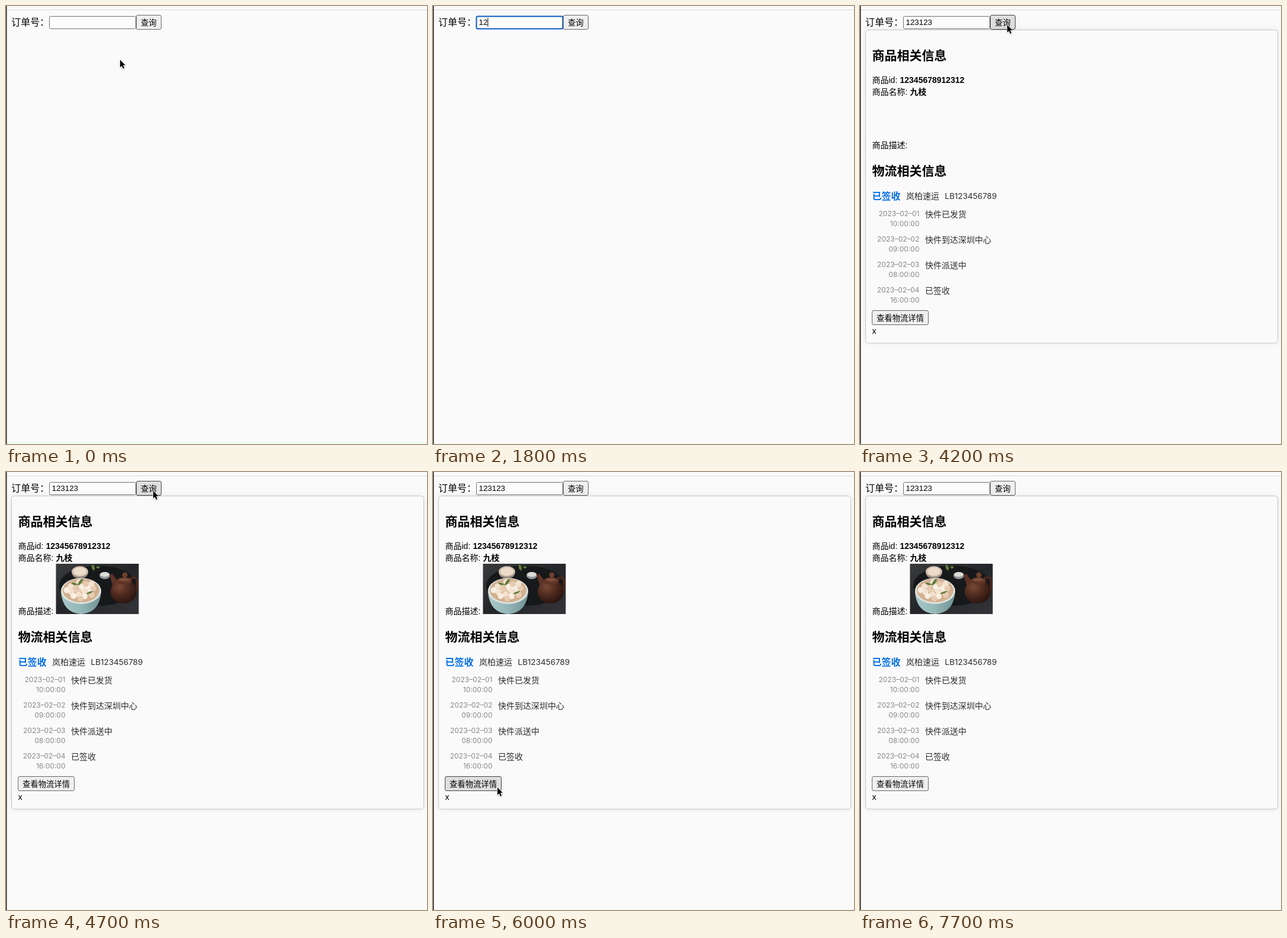
Recreate the animation shown at these times as an HTML page. Size 712 px wide and 740 px high, loop 7800 ms.

```html
<!DOCTYPE html>
<html lang="zh-CN">
<head>
<meta charset="utf-8">
<title>订单查询</title>
<style>
html, body { margin: 0; width: 100%; height: 100%; overflow: hidden; background: #fafafa; }
svg { display: block; width: 712px; height: 740px; }
text { font-family: "Liberation Sans", "Noto Sans CJK SC", "Noto Sans CJK", sans-serif; font-size: 14px; font-weight: 500; fill: #000; white-space: pre; }
.label { font-size: 16px; font-weight: 400; }
.title { font-size: 21px; font-weight: bold; }
.strong { font-weight: bold; }
.status { font-size: 16px; font-weight: bold; fill: #026dec; }
.soft { fill: #2c2c2c; font-weight: 400; }
.code { font-family: Inter, sans-serif; font-size: 13.5px; }
.date { font-family: Inter, sans-serif; font-size: 12px; font-weight: 400; fill: #888; text-anchor: end; }
.control { font-size: 13.333px; }
.button { fill: #efefef; stroke: #666; }
.button.hover { fill: #dedede; stroke: #444; }
#field { fill: #fff; fill-opacity: .5; stroke: #707070; }
#field.focus { stroke: #0a5cc2; stroke-width: 2; fill-opacity: 1; }
</style>
</head>
<body>
<svg viewBox="0 0 712 740" xmlns="http://www.w3.org/2000/svg">
  <defs>
    <filter id="shadow" x="-5%" y="-5%" width="110%" height="110%">
      <feDropShadow dx="0" dy="0" stdDeviation="4" flood-color="#000" flood-opacity=".08"/>
    </filter>
    <filter id="drop" x="-50%" y="-50%" width="200%" height="200%">
      <feDropShadow dx="0" dy="1" stdDeviation=".8" flood-color="#000" flood-opacity=".3"/>
    </filter>
    <clipPath id="frame"><rect x="84.500" y="155" width="140" height="85"/></clipPath>
    <linearGradient id="table" x2="1" y2="1">
      <stop offset="0" stop-color="#3a3b3d"/>
      <stop offset=".5" stop-color="#242528"/>
      <stop offset="1" stop-color="#343539"/>
    </linearGradient>
    <radialGradient id="clay" cx=".35" cy=".3" r=".75">
      <stop offset="0" stop-color="#7a4936"/>
      <stop offset=".5" stop-color="#4d291e"/>
      <stop offset="1" stop-color="#29140f"/>
    </radialGradient>
    <linearGradient id="glaze">
      <stop offset="0" stop-color="#a9c9c9"/>
      <stop offset=".5" stop-color="#94b6b7"/>
      <stop offset="1" stop-color="#6f9193"/>
    </linearGradient>
  </defs>
  <rect width="712" height="740" fill="#fafafa"/>
  <rect id="strip" width="712" fill="#f1faf0"/>
  <rect y="6" width="712" height="1" fill="#dadada"/>
  <rect width="1.300" height="740" fill="#111"/>

  <text class="label" x="9" y="32.500">订单号：</text>
  <rect id="field" x="73.500" y="17.500" width="146" height="21" rx="2"/>
  <text id="typed" class="control" x="77.500" y="32"></text>
  <rect id="caret" y="20" width="1" height="15" fill="#000"/>
  <rect id="search" class="button" x="220.500" y="15.500" width="42" height="24" rx="2.500"/>
  <text class="control" x="228" y="32.500">查询</text>

  <g id="card">
    <rect x="9.500" y="40.500" width="697" height="529" rx="5" fill="#fafafa" stroke="#c6c6c6" filter="url(#shadow)"/>
    <text class="title" x="20.500" y="91">商品相关信息</text>
    <text x="20.500" y="130">商品id:</text>
    <text class="strong" x="67.500" y="130">12345678912312</text>
    <text x="20.500" y="150">商品名称:</text>
    <text class="strong" x="84.500" y="150">九枝</text>
    <text x="20.500" y="240">商品描述:</text>
    <g id="photo" clip-path="url(#frame)">
      <rect x="84" y="155" width="141" height="86" fill="url(#table)"/>
      <ellipse cx="156" cy="192" rx="66" ry="34" fill="#17181a"/>
      <path d="M111 169Q112 180 125 180Q138 180 139 169Z" fill="#8d8378"/>
      <ellipse cx="125" cy="168" rx="14" ry="9" fill="#cdbcaa"/>
      <ellipse cx="125" cy="168" rx="11" ry="7" fill="#eddcc9"/>
      <ellipse cx="167" cy="175" rx="9" ry="6" fill="#94979a"/>
      <ellipse cx="167" cy="173" rx="8" ry="4" fill="#dcdcd6"/>
      <path d="M93 203Q96 238 127 240Q158 238 161 203Z" fill="url(#glaze)"/>
      <ellipse cx="127" cy="201" rx="34" ry="22" fill="#dce2de"/>
      <ellipse cx="127" cy="200" rx="31" ry="20" fill="#d2af8f"/>
      <g id="fruit"></g>
      <g fill="#5f7b3c">
        <path d="M121 192q2-10 9-12q0 9-9 12ZM122 190q-8-5-12-2q5 5 12 2ZM135 206q5-5 13-5q-5 6-13 5ZM146 156q-4 6 3 11q4-6-3-11ZM152 161q4-4 7 0q-4 4-7 0Z"/>
      </g>
      <path d="M182 196L175 174L180 172L189 185Z" fill="#5b3225"/>
      <path d="M210 180Q223 174 222 190Q221 204 214 209" fill="none" stroke="#4a271c" stroke-width="4"/>
      <ellipse cx="199" cy="202" rx="22" ry="20" fill="url(#clay)"/>
      <ellipse cx="200" cy="184" rx="13" ry="6" fill="#603526"/>
      <ellipse cx="200" cy="182" rx="9" ry="3" fill="#7c4d3a"/>
      <circle cx="201" cy="174" r="4.500" fill="#6c402f"/>
    </g>
    <text class="title" x="20.500" y="286">物流相关信息</text>
    <text class="status" x="20.500" y="327">已签收</text>
    <text class="soft" x="78" y="326">岚柏速运</text>
    <text class="soft code" x="143.500" y="326">LB123456789</text>
    <g id="steps"></g>
    <rect id="details" class="button" x="20.500" y="514.500" width="95" height="24" rx="2.500"/>
    <text class="control" x="28" y="531.500">查看物流详情</text>
    <text x="20.500" y="554">x</text>
  </g>

  <path id="beam" d="M-2.500-7Q0-7 0-5V5Q0 7-2.500 7M2.500-7Q0-7 0-5M0 5Q0 7 2.500 7" fill="none" stroke="#222"/>
  <path id="arrow" d="M0 0V12.500L2.900 9.900L5 14.700L7.100 13.700L5 9.100H8.900Z" fill="#000" stroke="#fff" stroke-width="1.200" paint-order="stroke" filter="url(#drop)"/>
</svg>
<script>
const LOOP = 7800, TICK = 100;
const ORDER = "123123";
const $ = id => document.getElementById(id);
const show = (id, on) => $(id).setAttribute("display", on ? "inline" : "none");
const between = (t, from, to) => t >= from && t < to;

// Pointer stops: time, x, y
const path = [
  [0, 193, 91], [100, 190, 84], [500, 150, 28],
  [2300, 246, 48], [2400, 262, 43], [2600, 249, 32],
  [4800, 249, 32], [5100, 225, 313], [5500, 109, 533],
  [6200, 109, 533], [6600, 614, 21]
];

const steps = [
  ["01", "10", "快件已发货"],
  ["02", "09", "快件到达深圳中心"],
  ["03", "08", "快件派送中"],
  ["04", "16", "已签收"]
];

$("steps").innerHTML = steps.map(([day, hour, note], i) => {
  const y = 355 + i * 43;
  return `<text class="date" x="100.500" y="${y}">2023–02–${day}</text>
    <text class="date" x="100.500" y="${y + 16.5}">${hour}:00:00</text>
    <text class="soft" x="110" y="${y + 2}">${note}</text>`;
}).join("");

$("fruit").innerHTML = Array.from({ length: 20 }, (_, i) => {
  const r = Math.sqrt((i + .5) / 20), a = i * 2.4;
  const x = 127 + 26 * r * Math.cos(a), y = 199 + 15 * r * Math.sin(a);
  const tone = ["#f3e2d0", "#e6cbb2", "#f8eee1"][i % 3];
  return `<circle cx="${x.toFixed(1)}" cy="${y.toFixed(1)}" r="5" fill="${tone}"/>`;
}).join("");

function pointer(t) {
  const i = path.findIndex(p => p[0] > t);
  if (i < 0) return path[path.length - 1].slice(1);
  const [t0, x0, y0] = path[i - 1], [t1, x1, y1] = path[i];
  const k = (t - t0) / (t1 - t0), e = k * k * (3 - 2 * k);
  return [x0 + (x1 - x0) * e, y0 + (y1 - y0) * e];
}

function render(t) {
  const count = Math.max(0, Math.min(ORDER.length, Math.floor((t - 1600) / TICK)));
  const focused = between(t, 800, 2800);
  const [x, y] = pointer(t);

  $("typed").textContent = ORDER.slice(0, count);
  $("field").classList.toggle("focus", focused);
  $("caret").setAttribute("x", 77.5 + count * 7.415);
  show("caret", focused);

  $("search").classList.toggle("hover", between(t, 2500, 4900));
  $("details").classList.toggle("hover", between(t, 5500, 6300));
  show("card", t >= 3600);
  show("photo", t >= 4400);

  const strip = t < 500 ? 4 : 1;
  $("strip").setAttribute("y", 740 - strip);
  $("strip").setAttribute("height", strip);

  const beam = between(t, 500, 1600);
  show("beam", beam);
  show("arrow", t < 500 || between(t, 2300, 6700));
  $(beam ? "beam" : "arrow").setAttribute("transform", beam ? "translate(150.5 28)" : `translate(${x} ${y})`);
}

const start = performance.now();
function frame() {
  const t = (performance.now() - start) % LOOP;
  render(Math.floor(t / TICK) * TICK);
  requestAnimationFrame(frame);
}
frame();
</script>
</body>
</html>
```
